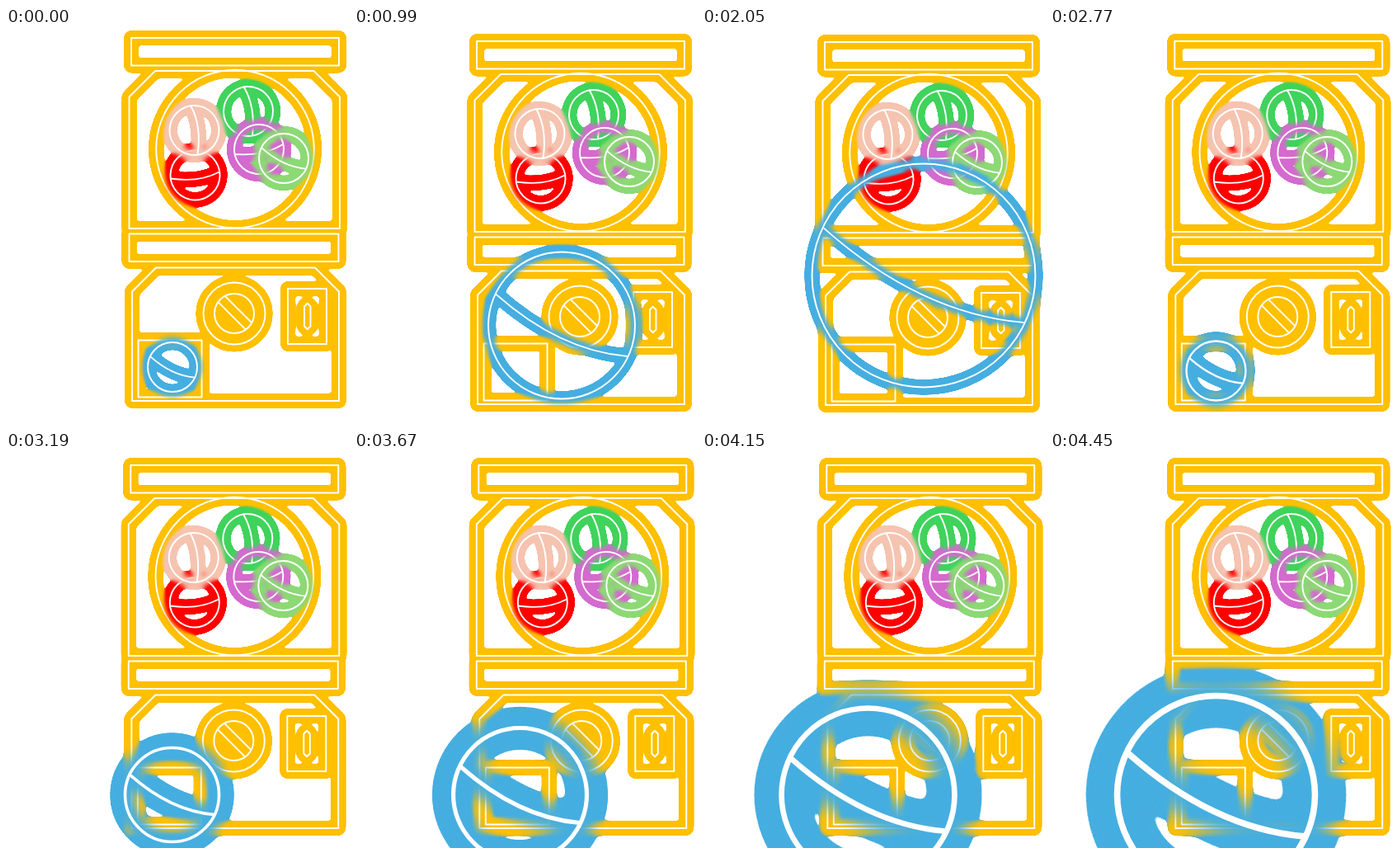
An HTML page that plays this animation: 415 px wide and 480 px high, repeating every 4.51 s.

```html
<!DOCTYPE html>
<html lang="en">
<head>
<meta charset="utf-8">
<title>Capsule machine</title>
<style>
  html, body { margin: 0; width: 100%; height: 100%; overflow: hidden; background: #fff; }
  svg { display: block; width: 415px; height: 480px; }
  path { fill: none; stroke-linejoin: round; stroke-linecap: round; }
  .glow { stroke-width: 11.6; filter: url(#soft); }
  .line { stroke: #fff; stroke-width: 1.9; }
</style>
</head>
<body>
<svg viewBox="0 0 415 480">
  <defs>
    <filter id="soft" x="-40%" y="-40%" width="180%" height="180%" color-interpolation-filters="sRGB">
      <feGaussianBlur stdDeviation="2.8"/>
    </filter>
    <!-- Cuts faint glow to a hard edge; overlapping glows still blend. -->
    <filter id="harden" filterUnits="userSpaceOnUse" x="0" y="0" width="415" height="480" color-interpolation-filters="sRGB">
      <feComponentTransfer><feFuncA type="linear" slope="50" intercept="-3.5"/></feComponentTransfer>
    </filter>
  </defs>
  <g filter="url(#harden)">
    <g id="machine"></g>
    <g id="capsule"></g>
  </g>
</svg>
<script>
const LOOP = 4510, R = 30;
const machine = document.getElementById('machine');
const capsule = document.getElementById('capsule');

const el = (parent, name, attrs) => {
  const node = document.createElementNS('http://www.w3.org/2000/svg', name);
  for (const key in attrs) node.setAttribute(key, attrs[key]);
  return parent.appendChild(node);
};

const neon = (parent, d, color) => [
  el(parent, 'path', { class: 'glow', d, stroke: color }),
  el(parent, 'path', { class: 'line', d })
];

const rect = (x0, y0, x1, y1) => `M${x0} ${y0}H${x1}V${y1}H${x0}Z`;
const circle = (x, y, r) => `M${x - r} ${y}a${r} ${r} 0 1 1 ${2 * r} 0a${r} ${r} 0 1 1 ${-2 * r} 0Z`;
const cutTop = (x0, y0, x1, y1, c) =>
  `M${x0} ${y0 + c}L${x0 + c} ${y0}H${x1 - c}L${x1} ${y0 + c}V${y1}H${x0}Z`;
const slot = (x0, y0, x1, y1, c) =>
  `M${x0} ${y0 + c}L${x0 + c} ${y0}H${x1 - c}L${x1} ${y0 + c}V${y1 - c}L${x1 - c} ${y1}H${x0 + c}L${x0} ${y1 - c}Z`;

// Ring with one bowed seam.
const ball = r =>
  circle(0, 0, r) + `M${-.89 * r} ${-.42 * r}Q${-.03 * r} ${.34 * r} ${.89 * r} ${.42 * r}`;

// Chord of the knob, running down to the right.
const chord = (x, y, r, off) => {
  const half = Math.sqrt(r * r - off * off), q = Math.SQRT1_2;
  const cx = x + off * q, cy = y - off * q;
  return `M${cx - half * q} ${cy - half * q}L${cx + half * q} ${cy + half * q}`;
};

neon(machine, [
  rect(152, 12, 404, 45.5),
  cutTop(149.5, 52, 405, 243, 31.5),
  circle(278, 146.5, 95.8),
  rect(149.5, 249.5, 403.5, 283),
  cutTop(153, 290.5, 404, 452, 29),
  circle(277, 346, 37.5),
  circle(277, 346, 24),
  chord(277, 346, 24, 7),
  chord(277, 346, 24, -4),
  rect(342, 316, 389, 383),
  slot(362, 334, 369.5, 365, 3.5),
  rect(160.5, 378.5, 237.5, 447.5)
].join(''), '#ffc000');

[
  [294, 101, 235, '#40d35c'],
  [229.5, 178.5, -33, '#ff0000'],
  [307, 147, -37, '#d46acf'],
  [228.5, 124, 237, '#f5c4b0'],
  [337, 158, 0, '#8cd975']
].forEach(([x, y, turn, color]) => {
  const g = el(machine, 'g', { transform: `translate(${x} ${y}) rotate(${turn})` });
  neon(g, ball(R), color);
});

const capsulePaths = neon(capsule, ball(R), '#45aee0');

// start, machine dx, dy, capsule x, y, radius
const poses = [
  [0, 0, 0, 202, 411, R],
  [460, -2, 7, 227, 387, 60],
  [990, -3, 4, 252, 360.5, 89],
  [1520, -1.5, 3, 261, 329, 112],
  [2050, -3, 5, 269, 300, 135.5],
  [2580, -.7, 4, 201.5, 415.5, R]
];

let shown = '';
function draw(t) {
  const [start, dx, dy, x, y, r] = poses.findLast(p => t >= p[0]);
  const step = t < 2710 ? 0 : 1 + Math.floor((t - 2710) / 60);
  const key = start + ':' + step;
  if (key === shown) return;
  shown = key;
  machine.setAttribute('transform', `translate(${dx} ${dy})`);
  capsule.setAttribute('transform', `translate(${x} ${y}) scale(${1 + step / 10})`);
  capsulePaths.forEach(p => p.setAttribute('d', ball(r)));
}

const begin = performance.now();
function tick() {
  draw((performance.now() - begin) % LOOP);
  requestAnimationFrame(tick);
}
tick();
</script>
</body>
</html>
```
